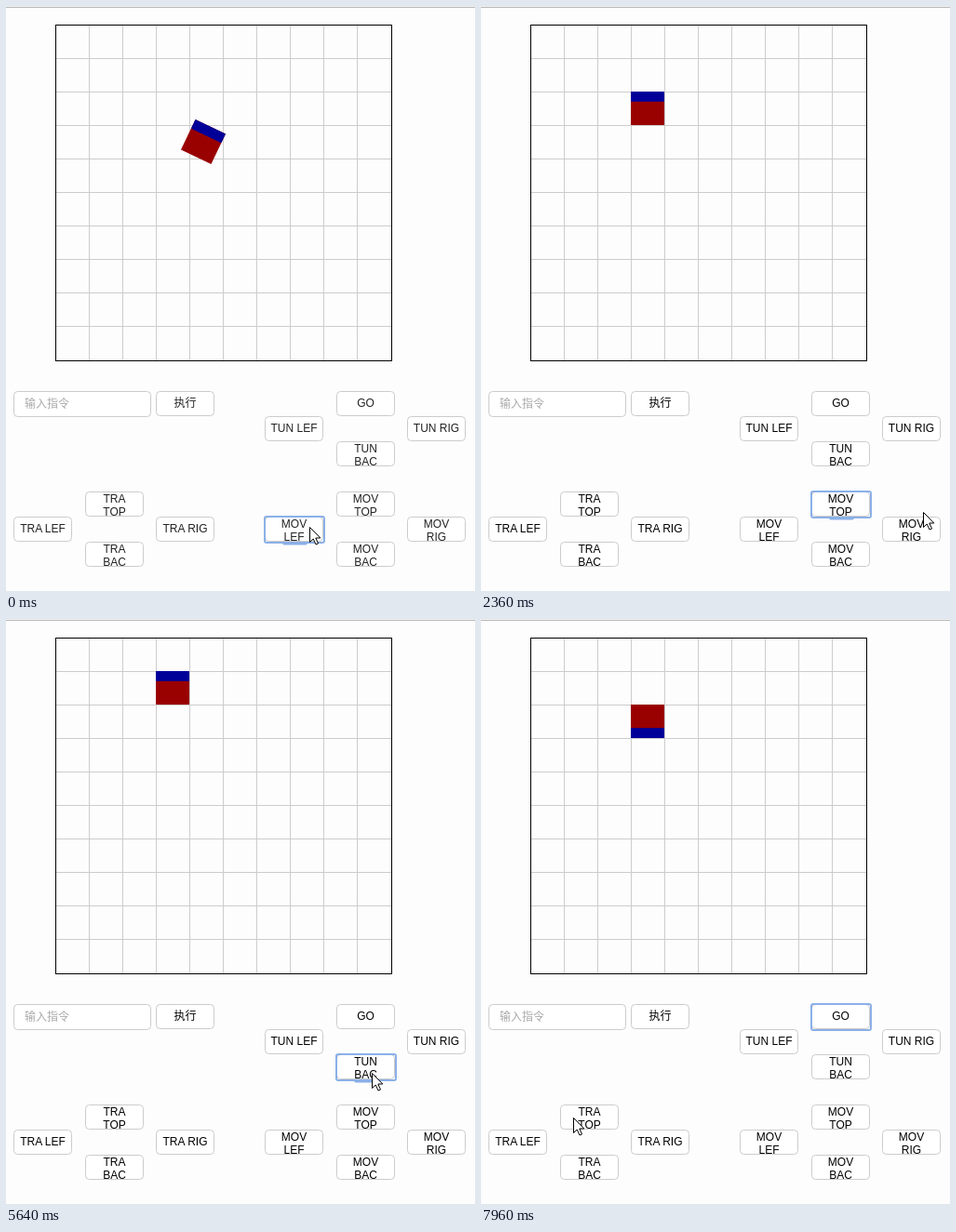
These frames come from a looping animation (504x629 px, 8 s). An HTML page:

```html
<!DOCTYPE html>
<html lang="zh">
<head>
<meta charset="utf-8">
<title>Grid walker</title>
<style>
  html, body { margin: 0; width: 100%; height: 100%; overflow: hidden; background: #fdfdfd; }
  svg { display: block; width: 100%; height: 100%; }
  text { font: 12px "Liberation Sans", Arial, "Noto Sans CJK SC", "Noto Sans CJK", sans-serif; }
  .line { fill: none; stroke: #ccc; }
  .box { fill: #fff; stroke: #ccc; }
  .ring { fill: none; stroke: #8bb0e8; stroke-width: 2; }
</style>
</head>
<body>
<svg id="stage" viewBox="0 0 504 629">
  <rect width="504" height="1" fill="#f1f1f1"/>
  <rect y="1" width="504" height="1" fill="#b9b9b9"/>
  <path id="grid" class="line"/>
  <rect x="53.5" y="20.5" width="361" height="361" fill="none" stroke="#000"/>
  <g id="walker">
    <rect x="-18" y="-18" width="36" height="36" fill="#900"/>
    <rect x="-18" y="-18" width="36" height="10.8" fill="#000099"/>
  </g>
  <rect class="box" x="8.5" y="414.5" width="147" height="27" rx="4"/>
  <text x="20" y="432" fill="#a9a9a9">输入指令</text>
  <g id="buttons" text-anchor="middle"></g>
  <path id="cursor" d="M.5 .5V16.5L4.2 13L7 19L9.5 18L6.8 12H11.8Z" fill="#fff" stroke="#000"/>
</svg>
<script>
const LOOP = 8000;
const FRAME = 137.3;        // the picture advances in visible steps
const FRAME_OFFSET = 42;
const MOVE_TIME = 1000;
const $ = id => document.getElementById(id);

function add(parent, tag, attrs, content = '') {
  const el = document.createElementNS('http://www.w3.org/2000/svg', tag);
  for (const key in attrs) el.setAttribute(key, attrs[key]);
  el.textContent = content;
  return parent.appendChild(el);
}

let gridPath = '';
for (let i = 1; i < 10; i++) {
  const n = i * 36;
  gridPath += `M${53.5 + n} 21V381M54 ${20.5 + n}H414`;
}
$('grid').setAttribute('d', gridPath);

const rings = {};
function addButton(x, y, label, wraps) {
  const group = add($('buttons'), 'g', { transform: `translate(${x} ${y})` });
  add(group, 'rect', { class: 'box', x: .5, y: .5, width: 62, height: 26, rx: 4 });
  const ring = add(group, 'g', { class: 'ring' });
  add(ring, 'rect', { x: 0, y: 0, width: 64, height: 28, rx: 2 });
  if (wraps) add(ring, 'path', { d: 'M20 28.5Q20 29.5 22 29.5H43Q45 29.5 45 28.5' });
  rings[label] = ring;
  const lines = wraps ? label.split(' ') : [label];
  lines.forEach((line, i) =>
    add(group, 'text', { x: 31.5, y: wraps ? 12 + 14 * i : 17 }, line));
}

function addPad(x, y, top, left, right, bottom, sidesWrap) {
  addButton(x + 77, y, top, top.includes(' '));
  addButton(x, y + 27, left, sidesWrap);
  addButton(x + 153, y + 27, right, sidesWrap);
  addButton(x + 77, y + 54, bottom, true);
}
addButton(161, 414, '执行');
addPad(278, 414, 'GO', 'TUN LEF', 'TUN RIG', 'TUN BAC', false);
addPad(8, 522, 'TRA TOP', 'TRA LEF', 'TRA RIG', 'TRA BAC', false);
addPad(278, 522, 'MOV TOP', 'MOV LEF', 'MOV RIG', 'MOV BAC', true);

// Each move adds to the walker's pose, starting from START.
const START = { x: 215, y: 146, turn: 0 };
const moves = [
  { at: -100, x: -36, turn: 270 },
  { at: 1290, y: -36, turn: -270 },
  { at: 3800, y: -36 },
  { at: 5716, turn: 180 },
  { at: 6760, y: 36 },
];

const focusChanges = [
  [0, 'MOV LEF'], [1230, 'MOV TOP'], [3800, 'GO'], [5600, 'TUN BAC'], [6720, 'GO'],
];

// time, x, y of the pointer tip
const pointerPath = [
  [0, 326, 560], [200, 328, 559], [824, 382, 532], [1000, 385, 531], [1500, 385, 531],
  [2150, 479, 549], [2334, 475, 544], [2550, 486, 552], [2750, 480, 545],
  [3295, 384, 456], [3432, 389, 443], [3570, 396, 427], [3900, 396, 427],
  [4400, 394, 533], [4668, 393, 506], [4805, 393, 500], [5217, 393, 488],
  [5800, 393, 488], [6316, 393, 436], [6500, 392, 432], [6950, 392, 432],
  [7689, 94, 538], [7963, 99, 536],
];

const bezier = (a, b, s) => 3 * a * s * (1 - s) ** 2 + 3 * b * s * s * (1 - s) + s ** 3;

// cubic-bezier(.25, .1, .25, 1)
function ease(t) {
  if (t <= 0) return 0;
  if (t >= 1) return 1;
  let low = 0, high = 1;
  for (let i = 0; i < 20; i++) {
    const mid = (low + high) / 2;
    if (bezier(.25, .25, mid) < t) low = mid; else high = mid;
  }
  return bezier(.1, 1, low);
}

function pointerAt(t) {
  const next = pointerPath.findIndex(p => p[0] > t);
  if (next < 0) return pointerPath[pointerPath.length - 1].slice(1);
  const [t0, x0, y0] = pointerPath[next - 1];
  const [t1, x1, y1] = pointerPath[next];
  const k = (t - t0) / (t1 - t0);
  return [x0 + (x1 - x0) * k, y0 + (y1 - y0) * k].map(Math.round);
}

function draw(t) {
  let { x, y, turn } = START;
  let turning = false;
  for (const move of moves) {
    const k = (t - move.at) / MOVE_TIME;
    const done = ease(k);
    x += (move.x || 0) * done;
    y += (move.y || 0) * done;
    turn += (move.turn || 0) * done;
    if (move.turn && k > 0 && k < 1) turning = true;
  }
  $('walker').setAttribute('transform',
    `translate(${Math.round(x)} ${Math.round(y)}) rotate(${turn})`);

  // Labels are drawn slightly softer while the walker turns.
  $('buttons').setAttribute('fill', turning ? '#222' : '#000');

  const focused = focusChanges.filter(([at]) => at <= t).pop()[1];
  for (const label in rings) rings[label].style.display = label === focused ? '' : 'none';

  $('cursor').setAttribute('transform', `translate(${pointerAt(t)})`);
}

function tick() {
  const time = performance.now() % LOOP;
  draw(Math.floor((time + FRAME_OFFSET) / FRAME) * FRAME);
  requestAnimationFrame(tick);
}
tick();
</script>
</body>
</html>
```
